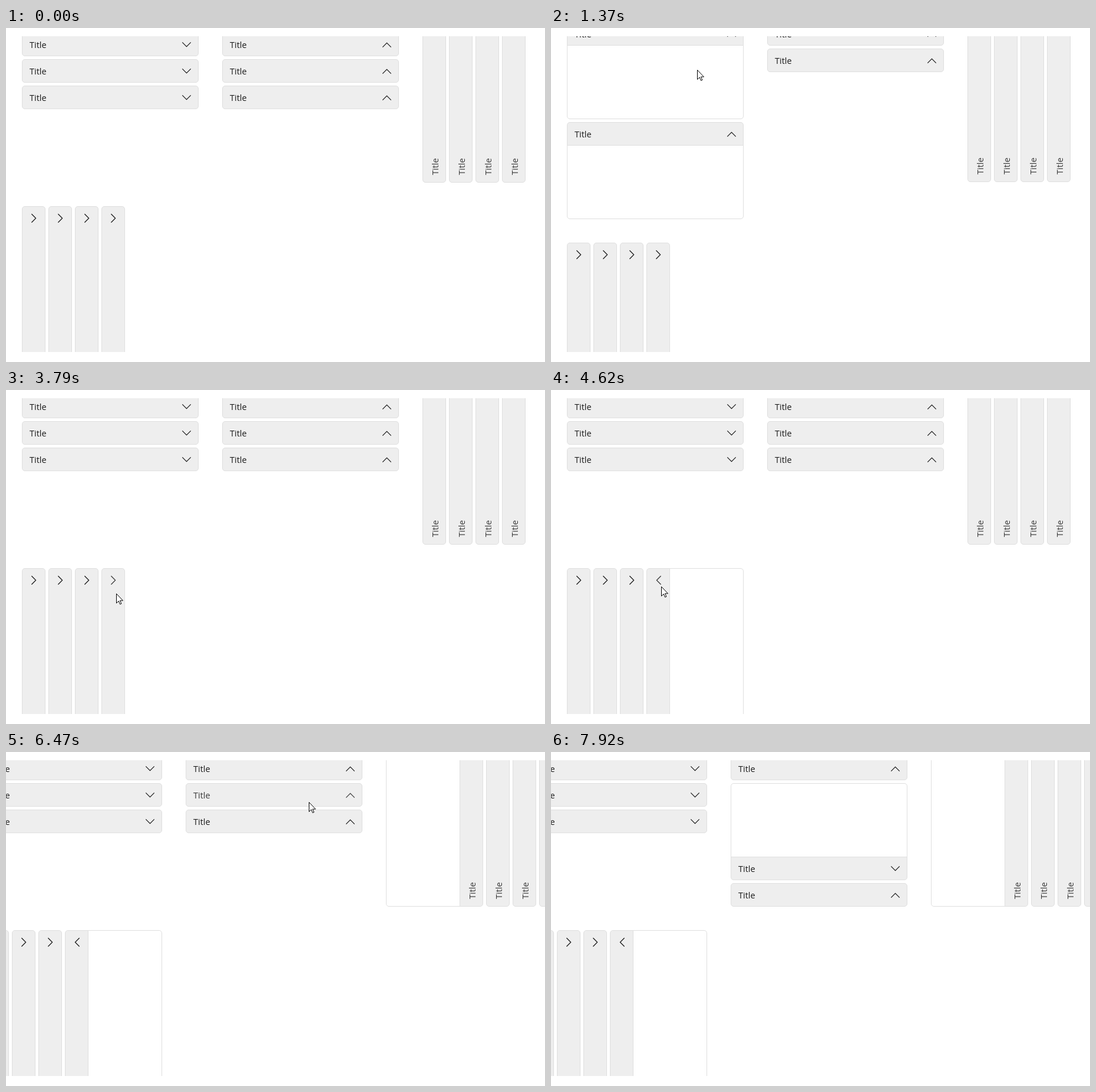
Animation, 915 px wide and 568 px high, one loop 8390 ms. Source, as an HTML page:

```html
<!DOCTYPE html>
<html lang="en">
<head>
<meta charset="utf-8">
<title>Expanders</title>
<style>
html, body { margin: 0; width: 100%; height: 100%; overflow: hidden; background: #fff; }
#view, #top { position: absolute; left: 0; width: 100%; overflow: hidden; }
#view { top: 14px; height: 537px; }
#top { top: 0; height: 100%; }
.box { position: absolute; box-sizing: border-box; border: 1px solid #dfdfdf; border-radius: 5px; overflow: hidden; }
.box svg { position: absolute; width: 300px; height: 300px; }
text { font: 14.5px "Open Sans", "Noto Sans", sans-serif; }
path { fill: none; stroke-width: 1.25; }
#cursor { fill: #fff; stroke: #000; stroke-width: 1; }
</style>
</head>
<body>
<div id="view"></div>
<svg id="top"><path id="cursor" d="M.5 .5V16.5L4.2 12.9 6.6 18.4 8.9 17.4 6.5 12.1H11.5Z"/></svg>
<script>
const LOOP = 8390, STEP = 70, HOLD = 270;
const HEAD = 40, BODY = 125, GAP = 5, LONG = 300, SPACE = 40, VIEW_TOP = 14;
const view = document.getElementById('view'), cursor = document.getElementById('cursor');

const groups = [
  { side: 'bottom', turn: 0 }, { side: 'top', turn: 180 },
  { side: 'left', turn: 90 }, { side: 'right', turn: -90 }];

// Pointer moves; a click is released HOLD ms after its move ends
const entry = { x: 847, y: 548 };
const moves = [
  { at: 70, ms: 540, x: 248, y: 120, click: true },
  { at: 960, ms: 140, x: 248, y: 71, click: true },
  { at: 1970, ms: 280, x: 273, y: 27, click: true },
  { at: 2810, ms: 210, x: 270, y: 118, click: true },
  { at: 3370, ms: 210, x: 240, y: 288 },
  { at: 3650, ms: 140, x: 187, y: 346, click: true },
  { at: 4130, ms: 350, x: 134, y: 347 },
  { at: 4550, ms: 760, x: 733, y: 206, click: true },
  { at: 5650, ms: 610, x: 801, y: 180 },
  { at: 6330, ms: 140, x: 514, y: 85, click: true },
  { at: 6810, ms: 210, x: 510, y: 59 },
  { at: 7290, ms: 630, x: 841, y: 568 }];
const release = m => m.at + m.ms + HOLD;

function pointerAt(t) {
  const i = moves.findLastIndex(m => m.at <= t), to = moves[i];
  if (i < 0 || (i === moves.length - 1 && t >= to.at + to.ms)) return null;
  const from = moves[i - 1] || entry;
  const p = Math.min((Math.floor((t - to.at) / STEP) + 1) * STEP / to.ms, 1), ease = p * p * (3 - 2 * p);
  return { x: Math.round(from.x + (to.x - from.x) * ease), y: Math.round(from.y + (to.y - from.y) * ease) };
}

// Four groups in two rows, centred on the stage
function layout(opened) {
  const isOpen = (g, i) => opened.has(g * 4 + i);
  const span = g => [0, 1, 2, 3].reduce((s, i) => s + HEAD + BODY * isOpen(g, i), 3 * GAP);
  const rowH = Math.max(LONG, span(0), span(1)), column = LONG + SPACE;
  const left = Math.round(454.5 - (2 * column + span(2)) / 2);
  const top = Math.round(282.5 - (rowH + SPACE + LONG) / 2);
  const spots = [[left, top], [left + column, top],
    [left + 2 * column, top + Math.floor((rowH - LONG) / 2)], [left, top + rowH + SPACE]];
  return spots.flatMap(([x, y], g) => [0, 1, 2, 3].map(i => {
    const open = isOpen(g, i), size = HEAD + BODY * open, tall = g > 1, { side, turn } = groups[g];
    const box = { id: g * 4 + i, x, y, open, tall, side, turn, w: tall ? size : LONG, h: tall ? LONG : size,
      hx: open && side === 'left' ? BODY : 0, hy: open && side === 'top' ? BODY : 0 };
    if (tall) x += size + GAP; else y += size + GAP;
    return box;
  }));
}

function isOver(b, p) {
  const dx = p.x - b.x - b.hx, dy = p.y - b.y - b.hy;
  return dx >= 0 && dy >= 0 && dx < (b.tall ? HEAD : LONG) && dy < (b.tall ? LONG : HEAD);
}

function openedAt(t) {
  const opened = new Set();
  for (const m of moves.filter(m => m.click && release(m) <= t)) {
    const hit = layout(opened).find(b => isOver(b, m));
    if (!opened.delete(hit.id)) opened.add(hit.id);
  }
  return opened;
}

function render(b, pointer, pressing) {
  const ink = !(pointer && isOver(b, pointer)) ? '#1a1a1a' : pressing ? '#8a8a8a' : '#3a3a3a';
  const fill = b.open ? `linear-gradient(to ${b.side}, #eee 38px, #dfdfdf 0 39px, #fff 0)` : '#eee';
  const label = b.tall ? 'translate(26.5 287) rotate(-90)' : 'translate(13 26)';
  const mark = `translate(${b.tall ? 20.5 : 279.5} 20.5) rotate(${b.turn + (b.open ? 180 : 0)})`;
  return `<div class="box" style="left:${b.x}px;top:${b.y - VIEW_TOP}px;width:${b.w}px;height:${b.h}px;background:${fill}">
    <svg style="left:${b.hx - 1}px;top:${b.hy - 1}px">
    <text transform="${label}" fill="${ink}" opacity="${b.tall ? 0.85 : 1}">Title</text>
    <path transform="${mark}" stroke="${ink}" d="M-7.2-4.1L0 3.1 7.2-4.1"/></svg></div>`;
}

let shown = '';
const start = performance.now();
function frame() {
  const t = (performance.now() - start) % LOOP, pointer = pointerAt(t);
  const pressing = moves.some(m => m.click && t >= release(m) - STEP && t < release(m));
  const html = layout(openedAt(t)).map(b => render(b, pointer, pressing)).join('');
  if (html !== shown) view.innerHTML = shown = html;
  cursor.style.display = pointer ? '' : 'none';
  if (pointer) cursor.setAttribute('transform', `translate(${pointer.x} ${pointer.y})`);
  requestAnimationFrame(frame);
}
frame();
</script>
</body>
</html>
```
